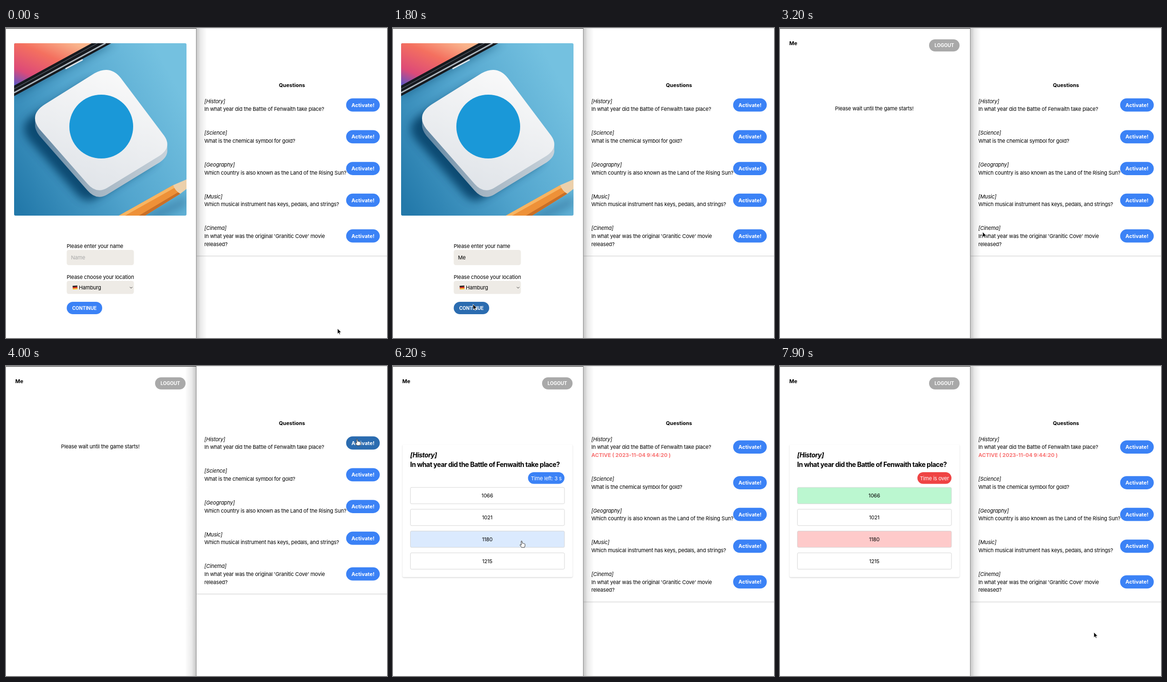
Recreate the animation shown at these times as an HTML page. Size 800x651 px, loop 8000 ms.

```html
<!DOCTYPE html>
<html lang="en">
<head>
<meta charset="utf-8">
<title>Quiz demo</title>
<style>
  html, body { margin: 0; width: 100%; height: 100%; overflow: hidden; background: #fff; }
  svg { display: block; width: 800px; height: 651px; }
  text { font: 11px Inter, "Open Sans", sans-serif; letter-spacing: -.0175em; fill: #000; white-space: pre; }
  .b { font-weight: 700; letter-spacing: 0; }
  .i { font-style: italic; }
  .m { text-anchor: middle; }
  .w { fill: #fff; }
  .cap { font-size: 9.7px; }
  .big { font-size: 12.5px; letter-spacing: -.003em; }
  .head { font-size: 13.9px; letter-spacing: -.035em; }
  .link { fill: #2b95cf; text-decoration: underline; }
  .blue { fill: #3b82f6; }
  .hover { fill: #2b6cb0; }
  .gray { fill: #a9a9a9; }
  .field { fill: #eeebe6; }
  .answer { fill: #fff; stroke: #d6d6d6; }
  .card { fill: #fff; filter: drop-shadow(0 1.2px 1.2px rgba(0,0,0,.2)); }
  #active { fill: #f87171; }
</style>
</head>
<body>
<svg viewBox="0 0 800 651" xmlns="http://www.w3.org/2000/svg">
  <defs>
    <linearGradient id="desk" x1="1" y1=".35" x2="0" y2=".9">
      <stop offset="0" stop-color="#74c1e0"/><stop offset=".5" stop-color="#51a4cd"/><stop offset="1" stop-color="#2379aa"/>
    </linearGradient>
    <linearGradient id="screen" x1=".75" y1="0" x2="0" y2=".95">
      <stop offset="0" stop-color="#f9b48c"/><stop offset=".35" stop-color="#f4705f"/>
      <stop offset=".75" stop-color="#dd4a78"/><stop offset="1" stop-color="#5f55c4"/>
    </linearGradient>
    <linearGradient id="tile" x1=".7" y1="0" x2=".3" y2="1">
      <stop offset="0" stop-color="#fafafa"/><stop offset="1" stop-color="#dfe3e8"/>
    </linearGradient>
    <linearGradient id="edge">
      <stop offset="0" stop-color="#5c83a0"/><stop offset=".45" stop-color="#a3b4c2"/><stop offset="1" stop-color="#c8d2da"/>
    </linearGradient>
    <linearGradient id="shadeR"><stop offset="0" stop-opacity=".22"/><stop offset=".4" stop-opacity=".08"/><stop offset="1" stop-opacity="0"/></linearGradient>
    <linearGradient id="shadeL" x1="1" x2="0"><stop offset="0" stop-opacity=".22"/><stop offset=".4" stop-opacity=".08"/><stop offset="1" stop-opacity="0"/></linearGradient>
    <filter id="soft" x="-30%" y="-30%" width="160%" height="160%"><feGaussianBlur stdDeviation="9"/></filter>
    <clipPath id="frame"><rect x="17" y="32" width="362" height="362" rx="3"/></clipPath>
    <path id="slab" d="M82 160 L186 95 Q219 77 241 105 L332 226 Q349 250 323 268 L212 336 Q190 349 171 327 L70 212 Q47 182 82 160Z"/>
  </defs>

  <g id="picture"><g clip-path="url(#frame)">
    <rect x="17" y="32" width="362" height="362" fill="url(#desk)"/>
    <path d="M17 146 L230 32 H180 L17 128Z" fill="#0c3f63" opacity=".45" filter="url(#soft)"/>
    <path d="M17 32 H184 L17 123Z" fill="url(#screen)"/>
    <path d="M180 32 H221 L17 143 V121Z" fill="#16191e"/>
    <path d="M192 32 L17 128" stroke="#59636d" stroke-width="1.2"/>
    <path d="M209 32 L17 136" stroke="#aab4bc" stroke-width="3"/>
    <path d="M126 85 L160 67" stroke="#dfe5e9" stroke-width="3" stroke-linecap="round"/>
    <use href="#slab" x="-23" y="22" fill="#06395f" opacity=".8" filter="url(#soft)"/>
    <use href="#slab" y="14" fill="url(#edge)"/>
    <use href="#slab" y="7" fill="url(#edge)"/>
    <use href="#slab" fill="url(#tile)"/>
    <circle cx="200" cy="207" r="67" fill="#1a98d8"/>
    <path d="M280 400 L379 352 V372 L320 400Z" fill="#0d4a73" opacity=".35" filter="url(#soft)"/>
    <path d="M237 394 L351 330 L366 348 L292 394Z" fill="#ee9138"/>
    <path d="M237 394 L351 330 L355 335 L250 394Z" fill="#f8b562"/>
    <path d="M279 394 L363 344 L366 348 L292 394Z" fill="#c96f27"/>
    <path d="M351 330 L379 318 V338 L366 348 Q355 342 351 330Z" fill="#ecd0ab"/>
  </g></g>

  <g id="form">
    <text x="127.5" y="461.5">Please enter your name</text>
    <rect class="field" x="127.5" y="466" width="141" height="32" rx="4.5"/>
    <text id="typed" x="136.5" y="486"></text>
    <text x="127.5" y="527">Please choose your location</text>
    <rect class="field" x="127.5" y="531" width="141" height="27.5" rx="4.5"/>
    <g transform="rotate(-4 145 545)">
      <rect x="140" y="541.2" width="10" height="2.7" fill="#222"/>
      <rect x="140" y="543.8" width="10" height="2.7" fill="#d8241f"/>
      <rect x="140" y="546.3" width="10" height="2.5" fill="#f5bd2c"/>
    </g>
    <text x="153" y="549">Hamburg</text>
    <path d="M260 543.8 l2.7 2.7 2.7 -2.7" fill="none" stroke="#333"/>
    <rect id="go" class="blue" x="127.5" y="575" width="74.5" height="26" rx="13"/>
    <text class="b w cap m" x="164.7" y="591.5">CONTINUE</text>
  </g>

  <g id="welcome">
    <text class="big" x="23.5" y="510">You are logged in as</text>
    <text class="big b" x="145.5" y="510">Me</text>
    <path d="M168 511 L172 502 L177 507Z" fill="#f2b62e"/>
    <path d="M174 503 q1 -3 -1 -4 M176 505 q4 -1 5 -4" fill="none" stroke="#d9603f" stroke-width="1.3"/>
    <circle cx="171" cy="501" r=".9" fill="#3f8fd0"/>
    <circle cx="180" cy="507" r="1" fill="#d64a5d"/>
    <circle cx="177.5" cy="500" r="1" fill="#5fae57"/>
    <text class="big" x="181.5" y="510">. Ready for some fun?</text>
    <text class="big b link" x="312.5" y="510">Take the</text>
    <text class="big b link" x="23.5" y="529.5">quiz now!</text>
    <path d="M87.5 526 q0 -5 6 -5.5 q7 0 7 5.5 q0 2.5 -3 2.5 q-2 3 -4 0 q-6 1 -6 -2.5Z" fill="#e37f8f"/>
    <path d="M90 525 q3 -2 5 0 t4 0" fill="none" stroke="#a9485c" stroke-width=".9"/>
    <rect class="gray" x="23.5" y="555.5" width="63.5" height="25.5" rx="12.7"/>
    <text class="b w cap m" x="55.2" y="571.8">LOGOUT</text>
  </g>

  <g id="game">
    <text class="b" x="19.5" y="36">Me</text>
    <rect class="gray" x="313" y="23.8" width="64" height="25.5" rx="12.7"/>
    <text class="b w cap m" x="345" y="40">LOGOUT</text>
    <text id="wait" class="m" x="198" y="173">Please wait until the game starts!</text>
    <g id="quiz">
      <rect class="card" x="20" y="165" width="357" height="278.5" rx="3"/>
      <text class="head b i" x="36" y="192">[History]</text>
      <text class="head b" x="36" y="211.5">In what year did the Battle of Fenwaith take place?</text>
      <rect id="pill" y="223" height="24.5" rx="12.2"/>
      <text id="clock" class="w m" y="239.5"></text>
      <g id="answers"></g>
    </g>
  </g>

  <g id="admin">
    <rect id="board" class="card" x="400" y="-20" width="420" height="498"/>
    <text class="b m" x="600.5" y="124">Questions</text>
    <text id="active" class="b" x="416.5" y="191">ACTIVE ( 2023-11-04 9:44:20 )</text>
  </g>

  <rect id="right" x="400" width="22" height="651" fill="url(#shadeR)"/>
  <rect id="left" x="376" width="23" height="651" fill="url(#shadeL)"/>
  <rect x="399" width="1" height="651" fill="#8b8b8b"/>
  <rect width="399" height="1.3" fill="#454545"/>
  <rect x="400" width="400" height="1" fill="#d9d9d9"/>

  <g id="cursor">
    <path id="arrow" d="M0 0 V11.4 L2.6 9 L4.3 12.8 L6.1 12 L4.5 8.3 H8Z" fill="#000" stroke="#fff" stroke-width=".9"/>
    <path id="hand" d="M-1 0 Q0 -1.2 1 0 L1.5 4.3 Q3 3.3 3.7 4.8 Q5 4 5.6 5.3 Q7.2 4.8 7.2 6.6 V10 L6 13 H0 L-3 8.8 Q-4 7 -2.3 6.8 L-.6 8.2Z" fill="#fff" stroke="#222" stroke-width=".9"/>
    <path id="beam" d="M-2 -6 Q0 -6 0 -4.5 Q0 -6 2 -6 M0 -5 V5 M-2 6 Q0 6 0 4.5 Q0 6 2 6" fill="none" stroke="#222" stroke-width=".9"/>
  </g>
</svg>
<script>
const LOOP = 8000, STEP = 100, LINE = 16.67;
const $ = id => document.getElementById(id);
const show = (id, on) => { $(id).style.display = on ? '' : 'none'; };
const add = (parent, tag, attrs, text = '') => {
  const el = document.createElementNS('http://www.w3.org/2000/svg', tag);
  for (const key in attrs) el.setAttribute(key, attrs[key]);
  el.textContent = text;
  return parent.appendChild(el);
};

const questions = [
  ['History', 'In what year did the Battle of Fenwaith take place?'],
  ['Science', 'What is the chemical symbol for gold?'],
  ['Geography', 'Which country is also known as the Land of the Rising Sun?'],
  ['Music', 'Which musical instrument has keys, pedals, and strings?'],
  ['Cinema', "In what year was the original 'Granitic Cove' movie", 'released?']
];
const rows = questions.map(([topic, ...lines], i) => {
  const top = 157.6 + i * 66.67, mid = top + 4.1 + (lines.length - 1) * LINE / 2;
  const row = add($('admin'), 'g', {});
  add(row, 'text', { class: 'i', x: 416.5, y: top }, `[${topic}]`);
  lines.forEach((line, k) => add(row, 'text', { x: 416.5, y: top + LINE * (k + 1) }, line));
  const button = add(row, 'g', {});
  const face = add(button, 'rect', { class: 'blue', x: 714.2, y: mid - 13.9, width: 70.6, height: 27.8, rx: 13.9 });
  add(button, 'text', { class: 'b w m', x: 749.5, y: mid + 4.1 }, 'Activate!');
  return { row, button, face };
});

const answers = ['1066', '1021', '1180', '1215'].map((year, i) => {
  const y = 255 + i * 45.8;
  const box = add($('answers'), 'rect', { class: 'answer', x: 36.5, y, width: 323.5, height: 34.3, rx: 2.5 });
  add($('answers'), 'text', { class: 'm', x: 198, y: y + 21.2 }, year);
  return { box, y };
});

// time, x, y of the pointer tip
const path = [
  [0, 696, 631], [600, 205, 483], [1300, 205, 483], [1700, 168, 580], [2200, 168, 580],
  [2700, 336, 508], [3000, 336, 508], [3600, 681, 200], [3700, 681, 200], [4000, 737, 154],
  [4600, 737, 154], [4900, 358, 206], [5200, 358, 206], [5600, 368, 280], [5900, 367, 288],
  [6200, 270, 368], [6700, 270, 368], [7300, 675, 633], [7600, 659, 559], [LOOP, 659, 559]
];
function pointer(t) {
  const n = path.findIndex(p => p[0] > t);
  const [t0, x0, y0] = path[n - 1], [t1, x1, y1] = path[n];
  const u = (t - t0) / (t1 - t0), e = u * u * (3 - 2 * u);
  return [x0 + (x1 - x0) * e, y0 + (y1 - y0) * e];
}

function draw(t) {
  const [x, y] = pointer(t);
  const inForm = t < 2100, inGame = t >= 2900, inQuiz = t >= 5100;
  const active = t >= 4300, chosen = t >= 6500, over = t >= 7900;
  const rightFront = t >= 3600 && t < 5700;

  show('picture', !inGame);
  $('picture').setAttribute('transform', `translate(0 ${inForm ? 0 : 12.7})`);
  show('form', inForm);
  show('welcome', !inForm && !inGame);
  show('game', inGame);
  show('wait', !inQuiz);
  show('quiz', inQuiz);
  show('left', rightFront);
  show('right', !rightFront);

  const name = t < 1000 ? '' : t < 1200 ? 'M' : 'Me';
  $('typed').textContent = name || 'Name';
  $('typed').style.fill = name ? '#000' : '#a8a8a8';
  $('go').setAttribute('class', t >= 1600 ? 'hover' : 'blue');

  show('active', active);
  $('board').setAttribute('height', active ? 498 + LINE : 498);
  rows.forEach(({ row, button }, i) => {
    const target = i ? row : button;
    target.setAttribute('transform', `translate(0 ${active ? (i ? LINE : LINE / 2) : 0})`);
  });
  const onButton = t >= 3900 && t < 4700;
  rows[0].face.setAttribute('class', onButton ? 'hover' : 'blue');

  const left = 4 - Math.floor((t - 5100) / 700);
  const width = over ? 71.5 : 76.5;
  $('pill').setAttribute('x', 360 - width);
  $('pill').setAttribute('width', width);
  $('pill').style.fill = over ? '#ef4444' : '#3b82f6';
  $('clock').setAttribute('x', 360 - width / 2);
  $('clock').textContent = over ? 'Time is over' : `Time left: ${left} s`;

  let onAnswer = false;
  answers.forEach(({ box, y: top }, i) => {
    const hit = inQuiz && !chosen && x > 36 && x < 360 && y > top && y < top + 34.3;
    onAnswer = onAnswer || hit;
    box.style.fill = over && i === 0 ? '#bbf7d0'
      : chosen && i === 2 ? (over ? '#fecaca' : '#bfdbfe')
      : hit ? '#dbeafe' : '#fff';
  });

  const hand = onButton || onAnswer;
  const beam = inForm && x > 127 && x < 269 && y > 466 && y < 498;
  show('cursor', t < 1000 || t >= 1300);
  show('hand', hand);
  show('beam', beam);
  show('arrow', !hand && !beam);
  $('cursor').setAttribute('transform', `translate(${x.toFixed(1)} ${y.toFixed(1)})`);
}

const start = performance.now();
function tick() {
  const t = (performance.now() - start) % LOOP;
  draw(Math.floor(t / STEP) * STEP);
  requestAnimationFrame(tick);
}
tick();
</script>
</body>
</html>
```
